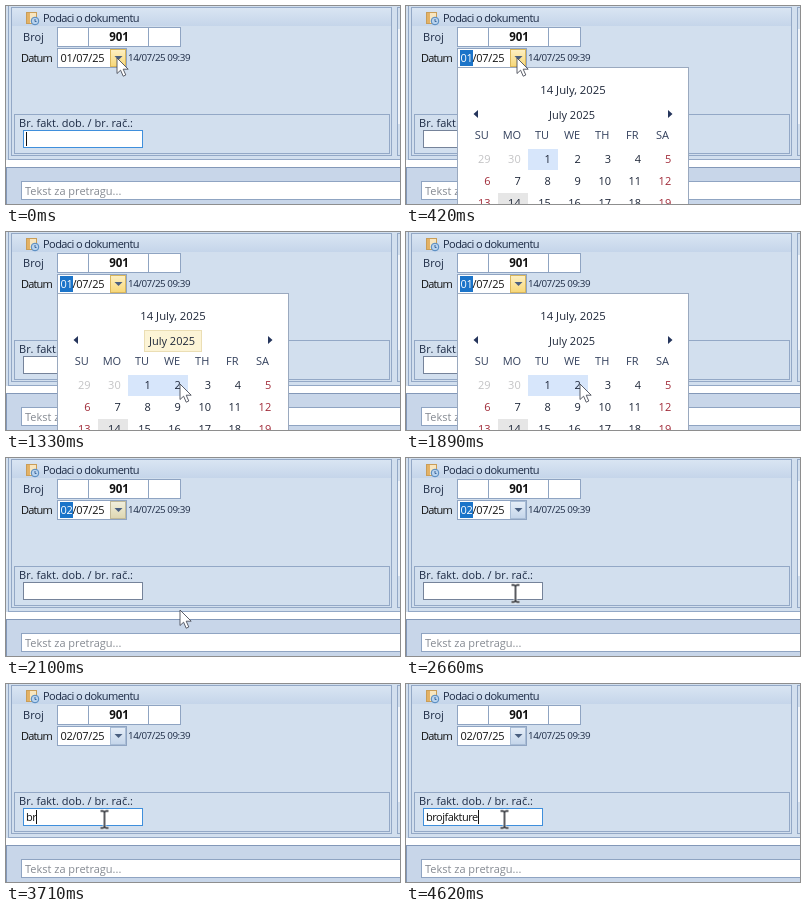
Write an HTML page that moves like this. It is 394 px wide and 198 px high and loops after 5040 ms.

```html
<!DOCTYPE html>
<html lang="hr">
<head>
<meta charset="utf-8">
<title>Podaci o dokumentu</title>
<style>
html, body { margin: 0; width: 100%; height: 100%; overflow: hidden; background: #d2dfee; }
svg { position: absolute; left: 0; top: 0; width: 394px; height: 198px; }
text, #typed { font-family: "Open Sans", "Noto Sans", sans-serif; font-size: 11px; fill: #1c2a44; }
text { white-space: pre; }
rect, path.line { shape-rendering: crispEdges; }
.box { fill: #fff; stroke: #8fa4c2; }
.line { fill: none; stroke: #93a8c6; }
.dates text { text-anchor: end; fill: #1d2638; }
.dates .out { fill: #c3c3c5; }
.dates .rest { fill: #a02a38; }
.names text { text-anchor: middle; fill: #33405c; }

/* one loop is 72 ticks of 70 ms */
.early, .late, .edit, .focus, .day text, .popup, .gold, .cell, .today, .month,
#cursor, .arrow, .beam, #typed::before { animation: 5040ms step-end infinite; }
.early { animation-name: early; }
.late { animation-name: late; }
.edit { animation-name: edit; }
.focus { animation-name: focus; }
.day text { animation-name: day; }
.popup { animation-name: popup; animation-timing-function: steps(3); }
.gold { animation-name: gold; animation-timing-function: steps(2); }
.cell { animation-name: cell; animation-timing-function: steps(3); }
.today { animation-name: today; }
.month { animation-name: month; }
#cursor { animation-name: travel; }
.arrow { animation-name: arrow; }
.beam { animation-name: beam; }

@keyframes early { 0% { opacity: 1 } 38.88%, 100% { opacity: 0 } }
@keyframes late { 0% { opacity: 0 } 38.88%, 100% { opacity: 1 } }
@keyframes edit { 0% { opacity: 0 } 1.38% { opacity: 1 } 59.71%, 100% { opacity: 0 } }
@keyframes focus { 0% { opacity: 1 } 1.38% { opacity: 0 } 59.71%, 100% { opacity: 1 } }
@keyframes day { 0% { fill: #111 } 1.38% { fill: #fff } 59.71%, 100% { fill: #111 } }
@keyframes popup {
  0%, 1.38% { opacity: 0 } 5.55%, 37.49% { opacity: 1 } 41.66%, 100% { opacity: 0 }
}
@keyframes gold { 0%, 40.27% { opacity: 1 } 43.05%, 100% { opacity: 0 } }
@keyframes cell { 0%, 22.22% { opacity: 0 } 26.38%, 100% { opacity: 1 } }
@keyframes today {
  0% { opacity: 0 } 16.66% { opacity: .5 } 18.05% { opacity: 1 }
  20.83% { opacity: .75 } 22.21% { opacity: .45 } 23.6% { opacity: .2 }
  24.99%, 100% { opacity: 0 }
}
@keyframes month {
  0% { opacity: 0 } 19.44% { opacity: .5 } 20.83% { opacity: 1 }
  23.6% { opacity: .8 } 24.99% { opacity: .65 } 26.38% { opacity: .5 }
  27.77% { opacity: .35 } 29.16% { opacity: .2 } 30.55% { opacity: .1 }
  31.94%, 100% { opacity: 0 }
}
@keyframes travel {
  0% { transform: translate(111px, 52px) }
  13.88% { transform: translate(111px, 52px); animation-timing-function: steps(2) }
  16.66% { transform: translate(121px, 68px); animation-timing-function: steps(4) }
  22.21% { transform: translate(158px, 127px); animation-timing-function: steps(2) }
  24.99% { transform: translate(174px, 152px) }
  45.83% { transform: translate(174px, 152px); animation-timing-function: steps(5) }
  52.77% { transform: translate(109.5px, 135.5px); animation-timing-function: steps(4) }
  58.32%, 100% { transform: translate(98.5px, 135.5px) }
}
@keyframes arrow { 0% { opacity: 1 } 51.38%, 100% { opacity: 0 } }
@keyframes beam { 0% { opacity: 0 } 51.38%, 100% { opacity: 1 } }

#typed { position: absolute; left: 20px; top: 126px; height: 14px; line-height: 14px;
  letter-spacing: -.5px; color: #111; white-space: pre; }
#typed::before { content: ""; display: inline-block; height: 14px; vertical-align: top;
  border-right: 1px solid #111; animation-name: type; }
@keyframes type {
  0% { content: "" }
  68.05% { content: "b" }
  70.83% { content: "br" }
  76.38% { content: "bro" }
  79.16% { content: "broj" }
  81.94% { content: "brojf" }
  84.72% { content: "brojfa" }
  87.49% { content: "brojfak" }
  90.27% { content: "brojfaktu" }
  91.66%, 100% { content: "brojfakture" }
}
</style>
</head>
<body>
<svg viewBox="0 0 394 198">
  <defs>
    <linearGradient id="head" x2="0" y2="1">
      <stop offset="0" stop-color="#d9e5f3"/><stop offset="1" stop-color="#c5d5ea"/>
    </linearGradient>
    <linearGradient id="sun" x2="0" y2="1">
      <stop offset="0" stop-color="#fdf0c4"/><stop offset="1" stop-color="#f7d777"/>
    </linearGradient>
    <linearGradient id="sky" x2="0" y2="1">
      <stop offset="0" stop-color="#e6eef8"/><stop offset="1" stop-color="#c4d5ea"/>
    </linearGradient>
    <path id="ibeam" d="M-4 -8.5H-1.5L0 -7.5L1.5 -8.5H4M0 -7.5V7.5M-4 8.5H-1.5L0 7.5L1.5 8.5H4"/>
  </defs>

  <!-- panels -->
  <rect width="394" height="198" fill="#d2dfee"/>
  <rect x="6" y="2" width="380" height="18" fill="url(#head)"/>
  <path class="line" d="M2.5 0V153.5H394M5.5 1.5H385.5V149.5H5.5ZM394 1.5H391.5V149.5H394"/>
  <rect x="392" y="23" width="2" height="95" fill="#f1f5fa"/>
  <rect y="154" width="394" height="7" fill="#fff"/>
  <rect y="162" width="394" height="36" fill="#c8d6e9"/>
  <path class="line" d="M0 161.5H394M.5 162V198" style="stroke:#8398b8"/>
  <rect class="box" x="15.5" y="175.5" width="390" height="18"/>
  <text x="19" y="189" style="fill:#858a92">Tekst za pretragu...</text>

  <!-- header -->
  <rect x="20.5" y="6.5" width="10" height="11" fill="#f8e6c0" stroke="#c99d58"/>
  <rect x="21" y="7" width="3" height="10" fill="#e3b266"/>
  <circle cx="29" cy="15" r="3.8" fill="#b9d3ee" stroke="#4f86bd"/>
  <path d="M29 13V15.5H30.5" fill="none" stroke="#3c6799"/>
  <text x="37" y="16" letter-spacing="-.57">Podaci o dokumentu</text>

  <!-- number and date -->
  <text x="17" y="35">Broj</text>
  <rect class="box" x="51.5" y="21.5" width="31" height="19"/>
  <rect class="box" x="82.5" y="21.5" width="60" height="19"/>
  <rect class="box" x="142.5" y="21.5" width="32" height="19"/>
  <text x="113" y="35" text-anchor="middle" style="font-size:11.5px;font-weight:700;fill:#111">901</text>
  <text x="15" y="56" letter-spacing="-.8" style="fill:#111">Datum</text>
  <rect class="box" x="51.5" y="42.5" width="69" height="19"/>
  <rect class="edit" x="54" y="44" width="13" height="16" fill="#1b74c9"/>
  <g class="day" letter-spacing="-.25">
    <g class="early"><text x="54.5" y="56">01</text></g>
    <g class="late"><text x="54.5" y="56">02</text></g>
  </g>
  <text x="66.5" y="56" letter-spacing="-.25" style="fill:#111">/07/25</text>
  <rect x="104.5" y="43.5" width="15" height="17" fill="url(#sky)" stroke="#a9bdd6"/>
  <rect class="gold" x="104.5" y="43.5" width="15" height="17" fill="url(#sun)" stroke="#d9b65c"/>
  <path d="M108.5 50H116.5L112.5 54Z" fill="#4a5f80"/>
  <text x="122" y="54.5" letter-spacing="-.45" style="font-size:9.8px">14/07/25 09:39</text>

  <!-- invoice number -->
  <rect class="line" x="8.5" y="108.5" width="375" height="39"/>
  <text x="13" y="121">Br. fakt. dob. / br. rač.:</text>
  <rect x="17.5" y="124.5" width="119" height="17" fill="#fff" stroke="#75839a"/>
  <rect class="focus" x="17.5" y="124.5" width="119" height="17" fill="none" stroke="#3f8fdc"/>

  <!-- calendar -->
  <g class="popup">
    <rect x="51.5" y="61.5" width="231" height="150" fill="#fff" stroke="#9aa9bf"/>
    <rect class="today" x="129.5" y="73.5" width="75" height="21" fill="#fbeebf" stroke="#e8d28c"/>
    <rect class="month" x="138.5" y="98.5" width="57" height="21" fill="#fae9ae" stroke="#d8bd6a"/>
    <text x="167" y="88" text-anchor="middle" style="font-size:11.3px;fill:#1d2638">14 July, 2025</text>
    <text x="166" y="113" text-anchor="middle" style="fill:#1d2638">July 2025</text>
    <path d="M72 104V112L67.5 108ZM262 104V112L266.5 108Z" fill="#25355c"/>
    <rect x="122" y="143" width="30" height="21" fill="#d7e6fb"/>
    <rect class="cell" x="152" y="143" width="30" height="21" fill="#d7e6fb"/>
    <rect x="92" y="187" width="30" height="11" fill="#e6e6e6"/>
    <g class="names" id="names"></g>
    <g class="dates" id="dates"></g>
  </g>
</svg>

<div id="typed" class="focus"></div>

<svg viewBox="0 0 394 198">
  <g id="cursor">
    <path class="arrow" d="M0 0V15.5L3.6 12.2L6.2 18.2L8.8 17L6.2 11.2H11.2Z" fill="#fff" stroke="#4b4f5a" stroke-width=".9"/>
    <g class="beam" fill="none">
      <use href="#ibeam" stroke="#fff" stroke-width="3"/>
      <use href="#ibeam" stroke="#15181f" stroke-width="1.4"/>
    </g>
  </g>
</svg>

<script>
const label = (host, x, y, value, kind = "") => {
  const node = document.createElementNS("http://www.w3.org/2000/svg", "text");
  node.setAttribute("x", x);
  node.setAttribute("y", y);
  node.setAttribute("class", kind);
  node.textContent = value;
  host.append(node);
};
const names = document.getElementById("names");
const dates = document.getElementById("dates");

["SU", "MO", "TU", "WE", "TH", "FR", "SA"].forEach((name, col) =>
  label(names, 75.8 + 30.1 * col, 132.5, name));

for (let i = 0; i < 21; i++) {
  const col = i % 7, row = Math.floor(i / 7);
  const kind = i < 2 ? "out" : col % 6 ? "" : "rest";
  label(dates, 84.6 + 30.1 * col, 157 + 22 * row, i < 2 ? 29 + i : i - 1, kind);
}
</script>
</body>
</html>
```
